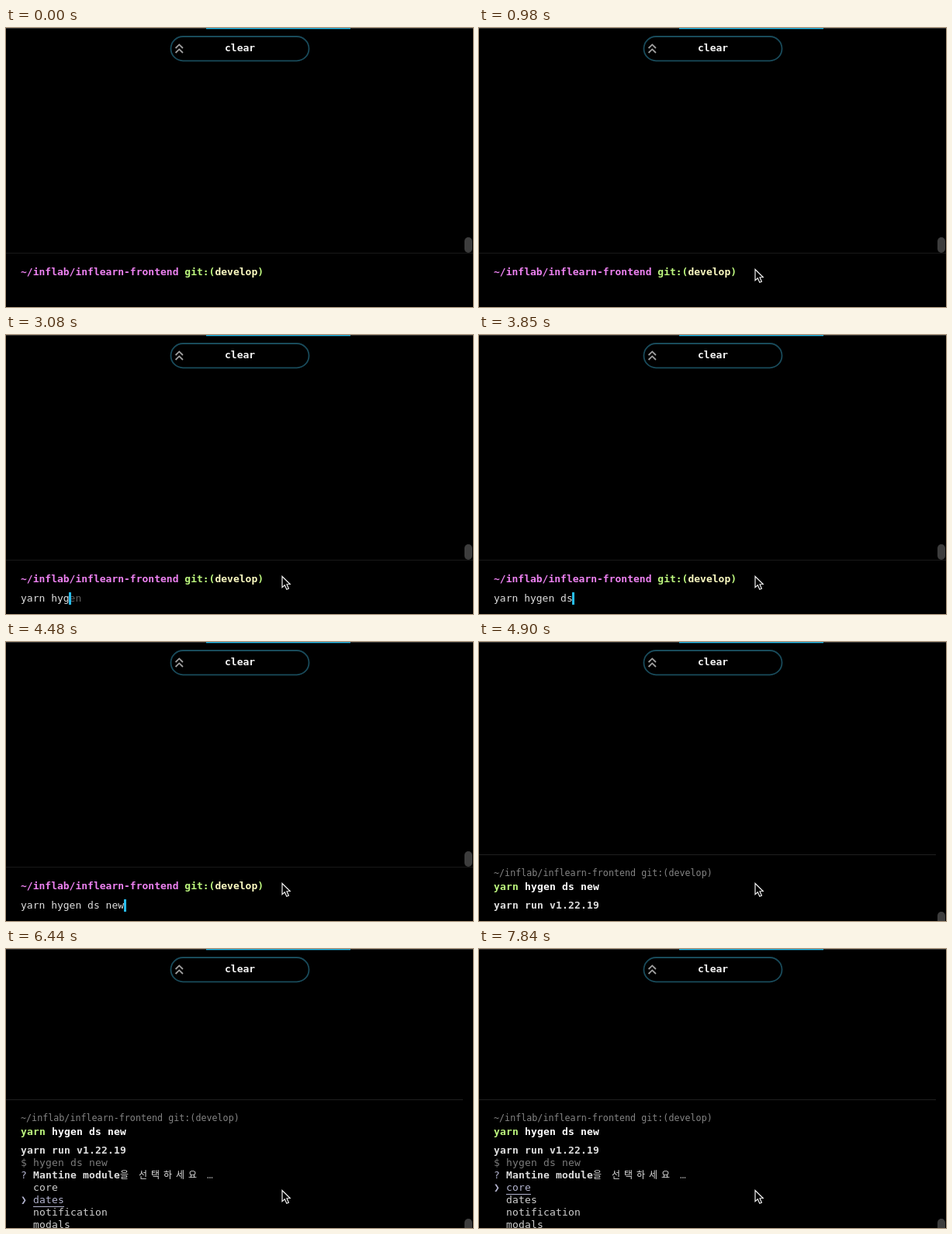
An HTML page with a canvas for the animation above (8000 ms loop, 602 by 360 pixels).

```html
<!DOCTYPE html>
<html lang="ko">
<head>
<meta charset="utf-8">
<title>Terminal</title>
<style>
  html, body { margin: 0; width: 100%; height: 100%; overflow: hidden; background: #000; }
  canvas { display: block; }
</style>
</head>
<body>
<canvas id="stage" width="602" height="360"></canvas>
<script>
const ctx = document.getElementById('stage').getContext('2d');
const LOOP = 8000;
const MONO = '"DejaVu Sans Mono", monospace';
const CJK = '"Noto Sans CJK KR", "Noto Sans CJK", sans-serif';
const LEFT = 19, INPUT = 7.826, CELL = 8, SMALL = 7.043;
const PATH = '~/inflab/inflearn-frontend';
const COLOR = {
  text: '#dedede', white: '#f5f5f5', dim: '#858585', hint: '#626262',
  magenta: '#ee82f2', green: '#bdf77e', yellow: '#fdfcc2',
  accent: '#27bdee', picked: '#b3b4cf'
};

// [time, typed text, suggestion]
const TYPING = [
  [0, '', ''],
  [1400, 'y', 'arn ds:new'],
  [1540, 'ya', 'rn ds:new'],
  [1610, 'yarn', ' ds:new'],
  [1750, 'yarn ', 'ds:new'],
  [2310, 'yarn h', 'ygen'],
  [2730, 'yarn hy', 'gen'],
  [3080, 'yarn hyg', 'en'],
  [3220, 'yarn hyge', 'n'],
  [3360, 'yarn hygen', ''],
  [3500, 'yarn hygen ', ''],
  [3710, 'yarn hygen d', ''],
  [3850, 'yarn hygen ds', ''],
  [4130, 'yarn hygen ds ', 'component add'],
  [4270, 'yarn hygen ds n', ''],
  [4340, 'yarn hygen ds ne', ''],
  [4480, 'yarn hygen ds new', '']
];
// [time, divider y, output rows]
const OUTPUT = [[4830, 290, 0], [4900, 274, 1], [5040, 258, 2], [5530, 194, 7]];
// [time, selected item]
const PICKS = [[5530, 0], [6440, 1], [6860, 2], [7070, 3], [7420, 2], [7560, 1], [7840, 0]];
const ITEMS = ['core', 'dates', 'notification', 'modals'];

const at = (list, t) => list.filter(e => e[0] <= t).pop();

// Draws on a fixed grid and returns the x after the last cell.
function put(str, x, y, color, step = CELL, bold = false, size = 13) {
  ctx.fillStyle = color;
  ctx.font = `${bold ? 'bold ' : ''}${size}px ${MONO}`;
  for (const ch of str) {
    const wide = /[가-힣]/.test(ch);
    if (wide) {
      ctx.save();
      ctx.font = `12px ${CJK}`;
    }
    ctx.fillText(ch, x, y);
    if (wide) ctx.restore();
    x += wide ? step * 2 : step;
  }
  return x;
}

function rect(x, y, w, h, color) {
  ctx.fillStyle = color;
  ctx.fillRect(x, y, w, h);
}

function pill(x, y, w, h, r) {
  ctx.beginPath();
  ctx.roundRect(x, y, w, h, r);
}

function header() {
  rect(0, 0, 602, 1, '#303030');
  rect(258, 0, 186, 1.3, COLOR.accent);
  pill(212.5, 11, 178, 31.3, 15.6);
  ctx.strokeStyle = '#194b5b';
  ctx.lineWidth = 1.8;
  ctx.stroke();
  ctx.strokeStyle = '#a0a0a0';
  ctx.beginPath();
  for (const y of [26, 32]) {
    ctx.moveTo(218.6, y);
    ctx.lineTo(223.3, y - 4.6);
    ctx.lineTo(228, y);
  }
  ctx.stroke();
  put('clear', 282, 30, COLOR.white, INPUT, true);
}

function scrollbar(y) {
  pill(591, y, 10, 20, 5);
  ctx.fillStyle = '#3d3d3d';
  ctx.fill();
}

function promptBox(t) {
  rect(0, 290, 602, 1, '#191919');
  scrollbar(270);
  let x = put(PATH + ' ', LEFT, 319, COLOR.magenta, INPUT, true);
  x = put('git:(', x, 319, COLOR.green, INPUT, true);
  x = put('develop', x, 319, COLOR.yellow, INPUT, true);
  put(')', x, 319, COLOR.green, INPUT, true);

  const [, typed, hint] = at(TYPING, t);
  x = put(typed, LEFT, 344, COLOR.text, INPUT);
  put(hint, x, 344, COLOR.hint, INPUT);
  const caret = t >= 1400 || (t >= 490 && t < 980);
  if (caret) rect(Math.round(x - 0.5), 332, 3, 16, COLOR.accent);
}

function menu(top, t) {
  const picked = at(PICKS, t)[1];
  put('?', LEFT, top, COLOR.picked);
  let x = put('Mantine module', LEFT + 16, top, COLOR.text, CELL, true);
  x = put('을 선택하세요 ', x, top, COLOR.text);
  put('…', x, top, COLOR.dim);
  ITEMS.forEach((item, i) => {
    const y = top + 16 * (i + 1);
    const on = i === picked;
    const end = put(item, LEFT + 16, y, on ? COLOR.picked : '#d0d0d0');
    if (!on) return;
    put('❯', LEFT, y, COLOR.picked);
    rect(35, y + 4, end - 35, 1, COLOR.picked);
  });
}

function block(t) {
  const [, top, rows] = at(OUTPUT, t);
  rect(0, top, 589, 1, '#202020');
  scrollbar(348);
  put(PATH + ' git:(develop)', LEFT, top + 28, COLOR.dim, SMALL, false, 11.7);
  const x = put('yarn ', LEFT, top + 46, COLOR.green, CELL, true);
  put('hygen ds new', x, top + 46, '#fff', CELL, true);
  const y = top + 70;
  if (rows > 0) put('yarn run v1.22.19', LEFT, y, COLOR.text, CELL, true);
  if (rows > 1) put('$ hygen ds new', LEFT, y + 16, '#7c7c7c');
  if (rows > 2) menu(y + 32, t);
}

function pointer(t) {
  if (t < 70) return;
  const left = 1 - Math.min(1, (t - 70) / 490);
  ctx.save();
  ctx.translate(356 - 10 * left ** 3, 311.5 + 4 * left ** 3);
  ctx.beginPath();
  const shape = [[0, 0], [0, 14.2], [3.3, 11.2], [5.8, 16.8], [8.4, 15.7], [6, 10.2], [10.2, 10]];
  shape.forEach(p => ctx.lineTo(...p));
  ctx.closePath();
  ctx.fillStyle = '#000';
  ctx.fill();
  ctx.strokeStyle = '#f0f0f0';
  ctx.lineWidth = 1.2;
  ctx.stroke();
  ctx.restore();
}

function draw(now) {
  const t = now % LOOP;
  rect(0, 0, 602, 360, '#000');
  header();
  if (t < OUTPUT[0][0]) promptBox(t);
  else block(t);
  pointer(t);
}

const start = performance.now();
function tick() {
  draw(performance.now() - start);
  requestAnimationFrame(tick);
}
tick();
</script>
</body>
</html>
```
